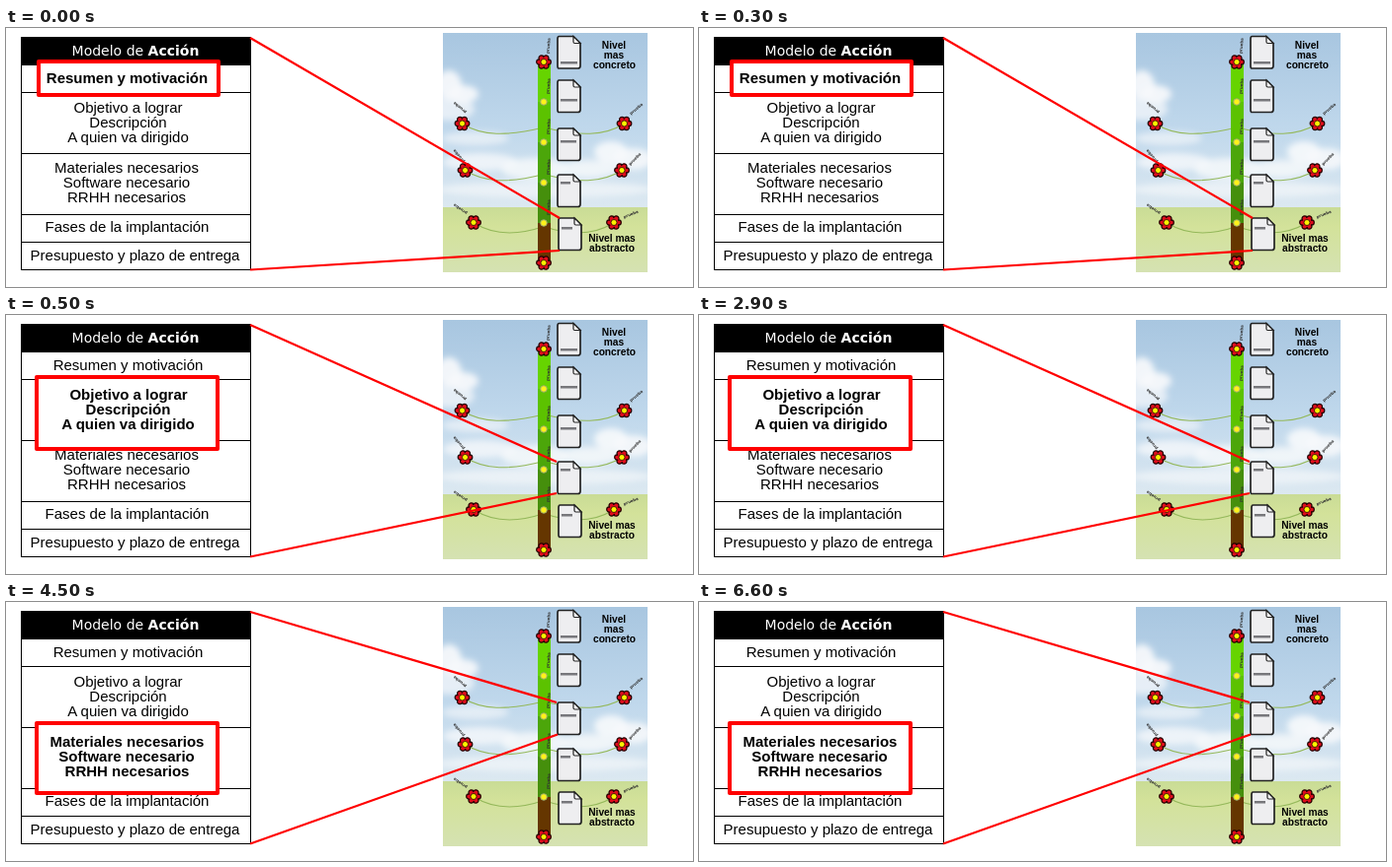
An HTML page that plays this animation: 695x263 px, repeating every 8000 ms.

```html
<!DOCTYPE html>
<html lang="es">
<head>
<meta charset="utf-8">
<title>Modelo de Acción</title>
<style>
  html, body { margin: 0; width: 100%; height: 100%; overflow: hidden; background: #fff; }
  svg { display: block; width: 695px; height: 263px; }
  text { text-anchor: middle; }
  .row { font: 15px "Liberation Sans", Arial, sans-serif; }
  .strong { font-weight: bold; }
  .head { font: 14px "DejaVu Sans", Verdana, sans-serif; fill: #fff; }
  .label { font: bold 10.2px "Liberation Sans", Arial, sans-serif; }
  .tag { font: bold 4px "DejaVu Sans", Verdana, sans-serif; fill: #333; }
  .crisp { shape-rendering: crispEdges; }
</style>
</head>
<body>
<svg viewBox="0 0 695 263">
  <defs>
    <linearGradient id="sky" x2="0" y2="1">
      <stop offset="0" stop-color="#a8c6e0"/>
      <stop offset=".55" stop-color="#c0d8ec"/>
      <stop offset="1" stop-color="#dde9f1"/>
    </linearGradient>
    <linearGradient id="grass" x2="0" y2="1">
      <stop offset="0" stop-color="#c9dc96"/>
      <stop offset=".3" stop-color="#d3e29a"/>
      <stop offset="1" stop-color="#d5e2b2"/>
    </linearGradient>
    <clipPath id="frame"><rect x="442" y="5" width="207" height="243"/></clipPath>
    <filter id="soft" x="-50%" y="-50%" width="200%" height="200%"><feGaussianBlur stdDeviation="3"/></filter>
    <g id="flower" stroke="#200" stroke-width="1.2">
      <g id="petals"></g>
      <circle r="3" fill="#fff200" stroke-width=".8"/>
    </g>
    <g id="sheet">
      <path d="M2.5 1H17l7 7v23q0 2.500-2.500 2.500h-19Q1 33.500 1 31V3.500Q1 1 2.500 1Z" fill="#eeeef0" stroke="#222" stroke-width="1.700"/>
      <path d="M17 1v5.500q0 1.500 1.500 1.500H24Z" fill="#fff" stroke="#222" stroke-width="1.200"/>
    </g>
  </defs>

  <g id="table"></g>

  <g clip-path="url(#frame)">
    <rect x="442" y="5" width="207" height="180" fill="url(#sky)"/>
    <g id="clouds" fill="#f8fafc" filter="url(#soft)"></g>
    <rect x="442" y="182" width="207" height="66" fill="url(#grass)"/>
    <g id="tree"></g>
  </g>
  <g id="scenes"></g>
</svg>

<script>
const NS = "http://www.w3.org/2000/svg";
const LOOP = 8000;
const $ = id => document.getElementById(id);

function add(parent, tag, attrs = {}, text) {
  const el = document.createElementNS(NS, tag);
  for (const key in attrs) el.setAttribute(key, attrs[key]);
  if (text) el.textContent = text;
  return parent.appendChild(el);
}

// Table: [text, centre x, baseline, bold centre x]
const rows = [
  ["Resumen y motivación", 123.5, 56, 122.5],
  ["Objetivo a lograr", 123.5, 86, 124],
  ["Descripción", 123.5, 101, 123.5],
  ["A quien va dirigido", 123.5, 116, 123.5],
  ["Materiales necesarios", 122, 147, 122.5],
  ["Software necesario", 122, 162, 122],
  ["RRHH necesarios", 122, 177, 122.5],
  ["Fases de la implantación", 122.5, 207],
  ["Presupuesto y plazo de entrega", 130.5, 236]
];
const table = $("table");
add(table, "rect", { x: 15.5, y: 9.5, width: 232, height: 236, fill: "#fff", stroke: "#000", class: "crisp" });
add(table, "rect", { x: 15, y: 9, width: 233, height: 29, class: "crisp" });
for (const y of [65, 127, 189, 217])
  add(table, "rect", { x: 15, y, width: 233, height: 1, class: "crisp" });
const head = add(table, "text", { x: 131, y: 28, class: "head" }, "Modelo de ");
add(head, "tspan", { class: "strong" }, "Acción");
for (const [text, x, y] of rows) add(table, "text", { x, y, class: "row" }, text);

// Landscape: [cx, cy, rx, ry, opacity]
const clouds = [
  [448, 58, 13, 15, .9], [463, 67, 15, 9, .9], [450, 82, 24, 12, .7],
  [475, 112, 34, 7, .6], [480, 136, 38, 9, .75], [535, 143, 34, 11, .8],
  [612, 126, 17, 11, .9], [634, 133, 20, 11, .85], [590, 143, 30, 9, .8],
  [545, 164, 110, 8, .6]
];
for (const [cx, cy, rx, ry, opacity] of clouds)
  add($("clouds"), "ellipse", { cx, cy, rx, ry, opacity });

for (let i = 0; i < 6; i++) {
  const a = i * Math.PI / 3;
  add($("petals"), "circle", { cx: 4.6 * Math.cos(a), cy: 4.6 * Math.sin(a), r: 2.7, fill: "#e00d1c" });
}
add($("petals"), "circle", { r: 4.6, fill: "#e00d1c", stroke: "none" });

const tree = $("tree");
const tag = (x, y, turn) =>
  add(tree, "text", { transform: `translate(${x} ${y}) rotate(${turn})`, y: 1.5, class: "tag" }, "prueba");

// Branches: [left x, right x, y]
const branches = [[461.5, 625.5, 97], [464.5, 623, 144.5], [473, 615, 197.5]];
for (const [left, right, y] of branches) {
  const d = `M${left} ${y}C${left + 20} ${y + 13} ${left + 45} ${y + 13} 544 ${y + 4}` +
            `C${right - 45} ${y + 13} ${right - 20} ${y + 13} ${right} ${y}`;
  add(tree, "path", { d, fill: "none", stroke: "#94b85a", "stroke-width": 1.1 });
}

const trunk = [[34, "#66d400"], [75, "#5cc200"], [116, "#4ca60a"], [157, "#458f0c"], [198, "#653600"]];
trunk.forEach(([y, fill], i) => {
  const end = i < 4 ? trunk[i + 1][0] : 240;
  add(tree, "rect", { x: 538, y, width: 13, height: end - y, fill, class: "crisp" });
  if (i) add(tree, "circle", { cx: 544, cy: y, r: 3.3, fill: "#fff21a", stroke: "#93a678", "stroke-width": .9 });
  tag(548.5, y - 16, -85);
});

const flowers = [[544, 34.5], [544, 238.5], ...branches.flatMap(([left, right, y]) => [[left, y], [right, y]])];
for (const [x, y] of flowers)
  add(tree, "use", { href: "#flower", transform: `translate(${x} ${y})` });

[[459, 81, 220], [458, 130, 230], [459.5, 184, 215], [637.5, 82, -40], [636, 133, -45], [632, 189, -22]]
  .forEach(t => tag(...t));

// Sheets: [x, y, bar y, bar width]
const sheets = [[557, 7.5, 35, 17], [557, 52, 73, 17], [557, 101, 115, 16], [557, 148, 157, 10], [558, 192, 203, 11]];
for (const [x, y, bar, width] of sheets) {
  add(tree, "use", { href: "#sheet", x, y });
  add(tree, "rect", { x: x + 4, y: bar - 1, width, height: 2.5, fill: "#77777b" });
}

const labels = [
  ["Nivel", 615, 21], ["mas", 615, 31], ["concreto", 615.5, 41],
  ["Nivel mas", 613, 217], ["abstracto", 613, 227]
];
for (const [text, x, y] of labels) add(tree, "text", { x, y, class: "label" }, text);

// Highlight steps: start, end, box, bold rows and the two line ends
const steps = [
  { from: 0, to: 500, box: [33, 34, 182, 34], rows: [0, 1], ends: [[560, 193], [560, 226]] },
  { from: 500, to: 4500, box: [31, 63, 183, 73], rows: [1, 4], ends: [[557, 149], [557, 181]] },
  { from: 4500, to: LOOP, box: [31, 123, 183, 71], rows: [4, 7], ends: [[557, 102], [558, 134.5]] }
];
for (const { from, to, box: [x, y, width, height], rows: span, ends } of steps) {
  const scene = add($("scenes"), "g", { opacity: 0 });
  const red = { stroke: "#f00", "stroke-width": 2.2 };
  ends.forEach(([x2, y2], i) => add(scene, "line", { x1: 247, y1: i ? 245.5 : 10, x2, y2, ...red }));
  add(scene, "rect", { x, y, width, height, fill: "#fff", ...red, "stroke-width": 4, "stroke-linejoin": "round" });
  for (const [text, , baseline, cx] of rows.slice(...span))
    add(scene, "text", { x: cx, y: baseline, class: "row strong" }, text);

  const frames = [{ offset: from / LOOP, opacity: 1, easing: "step-end" }];
  if (from > 0) frames.unshift({ offset: 0, opacity: 0, easing: "step-end" });
  if (to < LOOP) frames.push({ offset: to / LOOP, opacity: 0, easing: "step-end" });
  frames.push({ offset: 1, opacity: to < LOOP ? 0 : 1 });
  scene.animate(frames, { duration: LOOP, iterations: Infinity });
}
</script>
</body>
</html>
```
